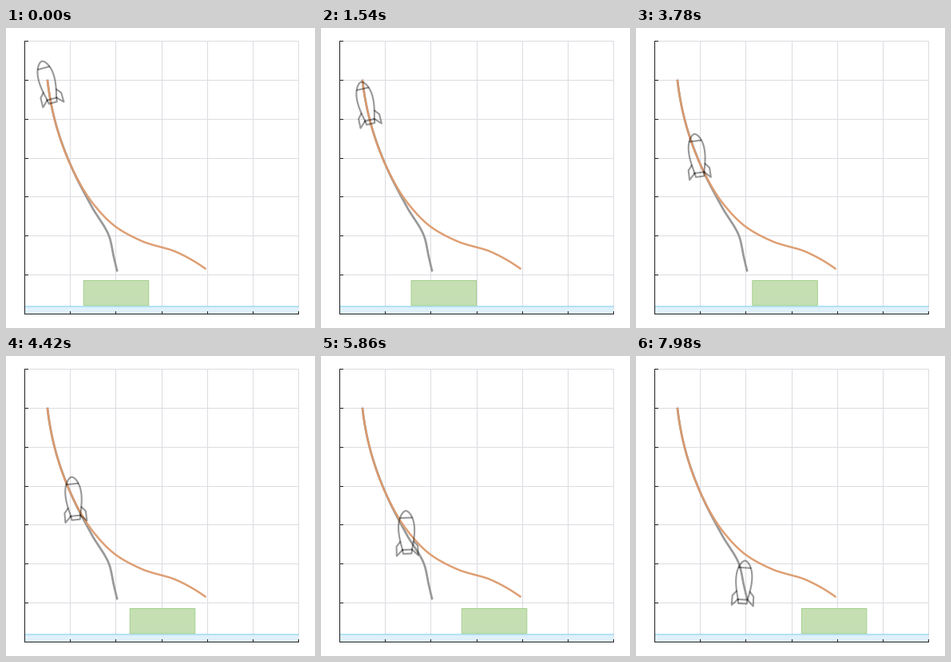
Animation of 387x376 px, one loop 8000 ms. Source, as a matplotlib script:

```python
import numpy as np
import matplotlib.pyplot as plt
from matplotlib.animation import FuncAnimation
from matplotlib.patches import Rectangle

plt.rcParams["path.snap"] = False

W, H, DPI = 387, 376, 64
PX = 72 / DPI                      # one pixel in points
STEP, LOOP, HOLD, TICK = 20, 8000, 500, 40   # ms
LAST = 188                         # motion steps in one loop
LEFT, RIGHT, TOP, BOTTOM = 23.5, 366.5, 16.5, 358.5
INK, GRID = "#222222", "#dcdce2"


def curve(points, n=160):
    """Smooth curve through a few points, by chord length."""
    pts = np.array(points, float)
    s = np.r_[0, np.cumsum(np.hypot(*np.diff(pts, axis=0).T))]
    slopes = np.gradient(pts, s, axis=0, edge_order=2)
    t = np.linspace(0, s[-1], n)
    i = np.clip(np.searchsorted(s, t, side="right") - 1, 0, len(s) - 2)
    h = (s[i + 1] - s[i])[:, None]
    u = (t - s[i])[:, None] / h
    return ((1 + 2 * u) * (1 - u) ** 2 * pts[i]
            + u * (1 - u) ** 2 * h * slopes[i]
            + u * u * (3 - 2 * u) * pts[i + 1]
            + u * u * (u - 1) * h * slopes[i + 1])


fig = plt.figure(figsize=(W / DPI, H / DPI), dpi=DPI, facecolor="white")
ax = fig.add_axes([0, 0, 1, 1])
ax.set_xlim(0, W)
ax.set_ylim(H, 0)
ax.axis("off")


def line(xs, ys, color, width=1, z=1, **kw):
    return ax.plot(xs, ys, color=color, lw=width * PX, zorder=z, **kw)[0]


# Grid, ground, axes and inward ticks
for x in np.floor(np.linspace(LEFT, RIGHT, 7)) + 0.5:
    line([x, x], [TOP, BOTTOM], GRID)
    line([x, x], [BOTTOM - 3, BOTTOM], INK, z=4)
for y in np.floor(np.linspace(TOP, BOTTOM, 8)) + 0.5:
    line([LEFT, RIGHT], [y, y], GRID)
    line([LEFT, LEFT + 4], [y, y], INK, z=4)
line([LEFT, LEFT, RIGHT], [TOP, BOTTOM, BOTTOM], INK, z=4)

GROUND = 349
ax.add_patch(Rectangle((LEFT, GROUND), RIGHT - LEFT, BOTTOM - GROUND,
                       fc="#dff1fb", ec="none", zorder=2))
line([LEFT, RIGHT], [GROUND, GROUND], "#8fd3ee", 1.2, z=3)

# Two trajectories that fork on the way down
shared = [(52, 66), (61, 115), (81, 172)]
short = curve(shared + [(108, 225), (129.5, 262), (135, 287), (139, 304)])
far = curve(shared + [(109, 220), (136, 248), (170, 267), (214, 281),
                      (249.5, 301.5)])
line(*short.T, "#999999", 2.7, z=5)
line(*far.T, "#dd9a6c", 2.5, z=6, alpha=0.95)

# Landing pad
PAD_X, PAD_SPEED = 97.2, 0.586
pad = ax.add_patch(Rectangle((PAD_X, 316.5), 81.5, 31.2, fc="#c5dfb3",
                             ec="#a6d08d", lw=PX, zorder=7))

# Rocket, nose up, with the origin at the point that rides the path
NOSE, BASE = -30, 19
u = np.linspace(0, 1, 40)
side = np.column_stack([10 * np.sin(0.8 * np.pi * u ** 0.62),
                        NOSE + (BASE - NOSE) * u])
FLIP = [-1, 1]
fin = np.array([(8.6, 9), (13.3, 14.5), (13.5, 26.5), (6.5, 19.5)])
parts = [
    np.vstack([(side * FLIP)[::-1], side, side[-1:] * FLIP]),
    np.array([(-7, -21), (7, -21)]),
    fin,
    fin * FLIP,
    np.array([(-6, 19), (-5.2, 24), (5.2, 24), (6, 19)]),
]
strokes = [line([], [], "black", 2.1, z=8, alpha=0.4,
                solid_joinstyle="round") for _ in parts]


def update(frame):
    t = frame * STEP
    k = 0 if t < HOLD else (t - HOLD) // TICK + 1
    pad.set_x(PAD_X + PAD_SPEED * k)

    # Slow start, then steady descent along the short path
    y = 64.5 + 1.18 * k + 6 * np.exp(-k / 10)
    x = np.interp(y, short[:, 1], short[:, 0])
    tilt = np.radians(-15 + 18.5 * (k / LAST) ** 1.1)
    c, s = np.cos(tilt), np.sin(tilt)
    for stroke, p in zip(strokes, parts):
        stroke.set_data(x + p @ [c, -s], y + p @ [s, c])
    return [pad, *strokes]


anim = FuncAnimation(fig, update, frames=LOOP // STEP, interval=STEP,
                     init_func=lambda: update(0), repeat=True)
plt.show()
```
